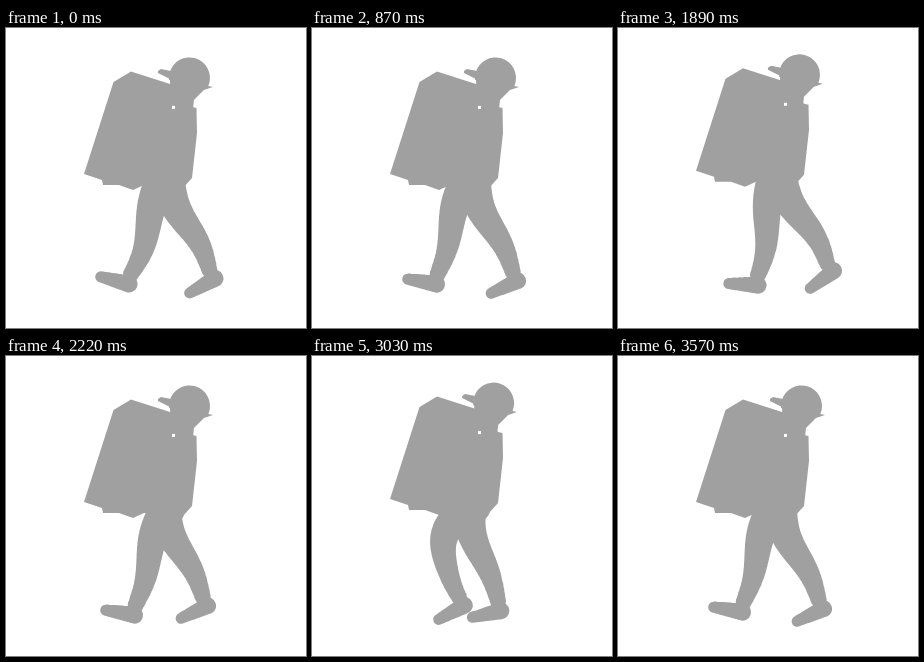
An HTML page with a canvas that plays this animation: 300x300 px, repeating every 3.6 s.

```html
<!DOCTYPE html>
<html lang="en">
<head>
<meta charset="utf-8">
<title>Walking courier</title>
<style>
html, body { margin: 0; width: 100%; height: 100%; overflow: hidden; background: #fff; }
canvas { display: block; width: 300px; height: 300px; }
</style>
</head>
<body>
<canvas id="stage" width="300" height="300"></canvas>
<script>
const ctx = document.getElementById('stage').getContext('2d');
const GREY = '#a0a0a0';
const STEP_MS = 30, CYCLE = 30;

// Key poses of one stride, starting at heel strike
const STRIDE = [
  { step: 0, x: 125, y: 246, tilt: 22, flex: -1 },
  { step: 3, x: 140, y: 247, tilt: 11, flex: 0 },
  { step: 11, x: 186, y: 245, tilt: -5, flex: 4 },
  { step: 16, x: 202, y: 237, tilt: -26, flex: 0 },
  { step: 18, x: 205, y: 232, tilt: -29, flex: 0 },
  { step: 22, x: 182, y: 226, tilt: -44, flex: 20 },
  { step: 25, x: 151, y: 234, tilt: -33, flex: 28 },
  { step: 28, x: 130, y: 245, tilt: 8, flex: 8 }
];

const TORSO = [
  [78, 146], [107.5, 54], [125, 43.5], [164, 56], [186, 79], [190.5, 80], [191, 105],
  [186, 150], [177, 160], [138, 157], [127, 162], [113, 157], [97, 157], [96, 152]
];
const FACE = [[164, 50], [207, 59], [198, 62], [188, 72], [187, 82], [165, 82]];
const BRIM = [[152, 43], [155, 41], [170, 44], [170, 54], [152, 45]];

const lerp = (a, b, t) => a + (b - a) * t;

function shape(points) {
  ctx.beginPath();
  points.forEach(([x, y]) => ctx.lineTo(x, y));
  ctx.fill();
}

// Fills the trail of a disc whose centre and radius depend on t in 0..1
function sweep(discAt) {
  const count = 40;
  ctx.beginPath();
  for (let i = 0; i <= count; i++) {
    const [x, y, r] = discAt(i / count);
    ctx.moveTo(x + r, y);
    ctx.arc(x, y, r, 0, Math.PI * 2);
  }
  ctx.fill();
}

// Smooth periodic interpolation between the key poses
function poseAt(step) {
  const n = STRIDE.length;
  const i = STRIDE.findLastIndex(k => k.step <= step);
  const [a, b, c, d] = [-1, 0, 1, 2].map(o => {
    const k = STRIDE[(i + o + n) % n];
    return { ...k, step: k.step + Math.floor((i + o) / n) * CYCLE };
  });
  const span = c.step - b.step, u = (step - b.step) / span;
  const value = name => {
    const m1 = (c[name] - a[name]) / (c.step - a.step) * span;
    const m2 = (d[name] - b[name]) / (d.step - b.step) * span;
    const rise = c[name] - b[name];
    return b[name] + u * (m1 + u * (3 * rise - 2 * m1 - m2 + u * (m1 + m2 - 2 * rise)));
  };
  return { x: value('x'), y: value('y'), tilt: value('tilt') * Math.PI / 180, flex: value('flex') };
}

function leg(step, bob, ox, oy) {
  const ankle = poseAt(step % CYCLE);
  const hip = { x: 157.5, y: 150 + bob };
  const dx = ankle.x - hip.x, dy = ankle.y - hip.y, length = Math.hypot(dx, dy);
  ctx.save();
  ctx.translate(ox, oy);
  sweep(t => {
    // The knee bows forward; thigh and calf bulge to opposite sides
    const bow = 4 * t * (1 - t) * ankle.flex + 3 * Math.sin(2 * Math.PI * t);
    return [
      hip.x + dx * t - dy / length * bow,
      hip.y + dy * t + dx / length * bow,
      lerp(17.5, 8, t)
    ];
  });
  ctx.translate(ankle.x, ankle.y);
  ctx.rotate(ankle.tilt);
  sweep(t => [lerp(2, -27, t), lerp(10, 14, t), lerp(8.5, 5.5, t)]);
  ctx.restore();
}

function upperBody(bob) {
  ctx.save();
  ctx.translate(0, bob);
  shape(TORSO);
  ctx.save();
  ctx.translate(bob * 0.65, 0);
  shape(FACE);
  shape(BRIM);
  ctx.beginPath();
  ctx.arc(183.5, 50, 20.5, Math.PI - 0.1, Math.PI * 2 + 0.5);
  ctx.fill();
  ctx.restore();
  ctx.fillStyle = '#fff';
  ctx.fillRect(166, 78, 3, 3);
  ctx.restore();
}

function draw(time) {
  const step = Math.floor(time / STEP_MS) % CYCLE;
  const bob = -3.4 * (1 + Math.cos((step - 6.9) / CYCLE * 4 * Math.PI));
  ctx.fillStyle = '#fff';
  ctx.fillRect(0, 0, 300, 300);
  ctx.fillStyle = GREY;
  leg(step, bob, 0, 0);
  leg(step + CYCLE / 2, bob, 4, 3);
  upperBody(bob);
}

const start = performance.now();
function tick() {
  draw(performance.now() - start);
  requestAnimationFrame(tick);
}
tick();
</script>
</body>
</html>
```
